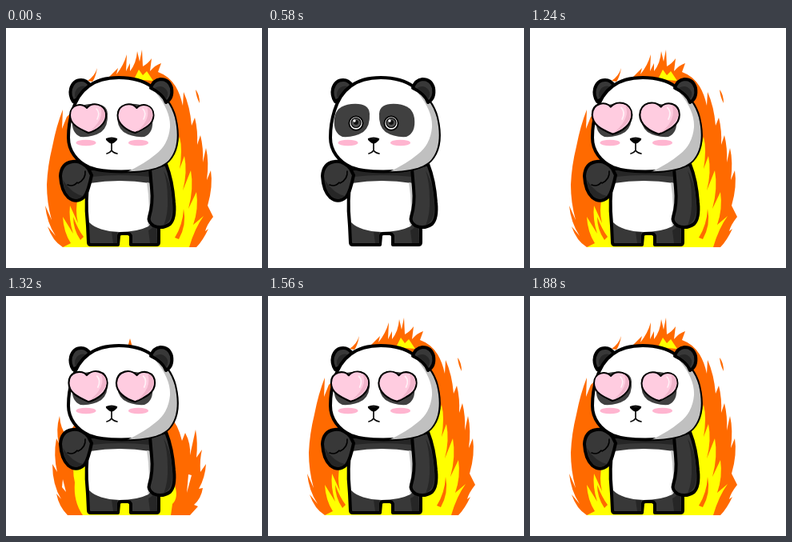
Write an HTML page that moves like this. It is 320 px wide and 300 px high and loops after 1.96 s.

```html
<!DOCTYPE html>
<html lang="en">
<head>
<meta charset="utf-8">
<title>Panda on fire</title>
<style>
  html, body { margin: 0; width: 100%; height: 100%; overflow: hidden; background: #fff; }
  svg { display: block; width: 320px; height: 300px; }
  .flame, #hearts { visibility: hidden; }
  .orange { fill: #ff6a00; }
  .yellow { fill: #ffff00; }
  .gap { fill: #fff; }
  .ink { stroke: #000; stroke-width: 4; stroke-linejoin: round; stroke-linecap: round; }
  .thin { stroke: #000; stroke-width: 1.6; stroke-linejoin: round; stroke-linecap: round; fill: none; }
  .fur { fill: #383838; }
  .shade { fill: #262626; }
  .patch { fill: #404040; }
  .blush { fill: #ffb5d0; }
  .heart { fill: #ffcce0; stroke: #000; stroke-width: 2; stroke-linejoin: round; }
  .glint { fill: none; stroke: #fff0f6; stroke-width: 1.6; stroke-linecap: round; }
  .dusk { fill: #f0b4ca; }
</style>
</head>
<body>
<svg viewBox="0 0 320 300">
  <defs>
    <clipPath id="headClip"><use href="#headShape"/></clipPath>
    <clipPath id="floor"><rect width="320" height="274"/></clipPath>
    <path id="headShape" d="M103 73C113 65 126 62 141 62C157 62 171 65 183 74C196 83 207 96 211 112C216 133 214 151 206 162C198 174 180 178 160 179C140 180 119 180 104 174C88 167 78 153 78 137C78 119 83 87 103 73Z"/>
    <path id="heart" d="M101 100C96 93 80 95 80 109C80 121 92 126 103 131C114 128 125 120 125 109C124 94 108 92 101 100Z"/>
    <g id="blaze">
      <path class="orange" d="M71 274Q58 266 52 248L62 260Q51 243 49 222L57 240Q51 218 51 196Q52 172 58 148Q63 122 71 102L70 126 76 111 90 98 126 64 140 50 138 58Q147 47 151 33L150 54 155 44 155 54Q163 44 164 29L167 42 170 27 171 48Q178 44 182 38L180 54Q187 46 194 44L190 55Q204 60 212 73Q218 83 221 97L222 80Q230 98 232 122L236 112Q240 128 239 146L243 134Q247 150 246 168L250 150Q254 167 251 190L256 178Q259 198 252 222L259 236Q251 246 249 254L253 251Q246 266 238 274Z"/>
      <path class="orange" d="M102 66Q111 60 114 50Q112 62 108 67ZM237 77Q242 83 242 94Q238 87 237 77Z"/>
      <path class="yellow" d="M160 64L166 52 171 59 176 54 184 66Z"/>
      <path class="yellow" d="M71 274L81 269Q72 255 71 236L84 257Q78 238 80 222L90 244Q86 228 90 212L104 205 190 172 212 152 217 136Q221 152 217 176L223 160Q227 180 221 203L231 178Q235 200 228 226L238 205Q241 226 234 246L247 235Q236 250 229 274Z"/>
      <path class="orange" d="M211 262Q221 246 222 226Q226 246 216 264ZM93 265Q84 252 84 236Q90 252 97 261Z"/>
    </g>
  </defs>

  <rect width="320" height="300" fill="#fff"/>

  <g clip-path="url(#floor)">
    <g class="flame">
      <path class="orange" d="M96 274Q85 255 83 231Q82 211 94 194L190 163 203 166Q215 181 212 204L215 210Q214 222 214 235L215 247Q210 263 201 274Z"/>
      <path class="gap" d="M214 180Q210 194 211 211L214 210ZM86 246L91 263 87 261Z"/>
      <path class="yellow" d="M141 274L144 262 148 266 151 257 155 274Z"/>
    </g>
    <use class="flame" href="#blaze" transform="translate(27.4 54.8) scale(.82 .8)"/>
    <use class="flame" href="#blaze"/>
    <g class="flame">
      <path class="orange" d="M77 274Q66 263 63 247L69 254Q58 236 58 210L64 220Q59 199 63 178L66 184Q62 167 67 150Q68 166 76 175L152 64 155 53 158 64 205 151Q215 160 220 181L224 171Q231 184 230 199L237 167Q240 184 238 202L245 192Q242 204 243 220L250 210Q249 227 241 241L246 240Q244 253 235 261L240 263 230 274Z"/>
      <path class="gap" d="M71 181L76 205 72 198ZM71 229L75 245 70 239ZM232 224L226 246 228 223Z"/>
      <path class="yellow" d="M96 274Q84 257 86 233Q82 217 87 204L104 200 190 215 211 237Q216 252 208 260L206 274Z"/>
    </g>
  </g>

  <g>
    <!-- body and legs -->
    <path class="fur ink" d="M105 176L182 176 188 215 191 247 191 268Q191 271 188 271H156V260Q155 257 152 257H145Q141 257 141 260L140 271H106Q103 271 103 268L102 247Q98 211 105 176Z"/>
    <path class="shade" d="M106 178H180V186Q142 182 107 186Z"/>
    <path class="shade" d="M178 253Q184 250 188 244L189 269H180ZM132 255H139V269H134Z"/>
    <path fill="#fff" d="M105 194Q142 188 180 194L182 220Q188 237 178 248Q164 255 142 255Q115 254 104 243Q101 214 105 194Z"/>
    <path fill="#c9c9c9" d="M176 193L181 194 183 222Q188 238 177 248Q181 225 176 193Z"/>

    <!-- arms -->
    <path class="fur ink" d="M180 176L200 170Q208 190 210 218Q212 238 205 245Q195 252 184 247Q177 242 179 236Q184 220 182 200Z"/>
    <path class="shade" d="M197 178Q208 197 208 226Q208 241 197 247Q203 232 202 213Q202 193 197 178Z"/>
    <g id="arm">
      <path class="fur ink" d="M103 176Q94 165 83 167Q69 169 68 185Q69 204 78 212Q88 220 98 211Q103 204 107 184Z"/>
      <path class="shade" d="M71 190Q73 206 81 212Q89 216 96 210Q82 207 71 190Z"/>
      <path class="thin" d="M77 196Q84 199 89 193M99 179Q100 189 90 194"/>
    </g>

    <!-- head -->
    <path class="fur ink" d="M84 92Q79 84 81 76Q84 65 94 65Q101 65 105 72L94 86Z"/>
    <path class="shade" d="M87 89Q84 78 91 74Q96 71 102 74Z"/>
    <use href="#headShape" class="ink" fill="#fff"/>
    <g clip-path="url(#headClip)">
      <path fill="#c0c0c0" d="M188 82Q206 104 205 124Q203 146 187 158Q173 170 149 181L222 185 220 82Z"/>
    </g>
    <path class="fur ink" d="M181 75Q184 65 193 64Q204 64 207 75Q209 88 200 93Q196 82 181 75Z"/>
    <path class="shade" d="M186 75Q195 70 201 78Q204 83 200 89Q195 80 186 75Z"/>

    <path class="patch" d="M83 113Q85 97 104 95Q126 93 127 107Q128 123 119 130Q108 137 93 136Q81 131 83 113Z"/>
    <path class="patch" d="M183 113Q181 97 162 95Q140 93 139 107Q138 123 147 130Q158 137 173 136Q185 131 183 113Z"/>
    <g id="eyes"></g>

    <ellipse class="blush" cx="100" cy="143.500" rx="12.500" ry="3.800"/>
    <ellipse class="blush" cx="165.500" cy="143.500" rx="12.500" ry="3.800"/>
    <path d="M125 138Q132 135 139 138Q140 140 135 143.500Q132 145.500 129 143.500Q124 140 125 138Z"/>
    <path d="M128 138.500Q132 137 136 138.500Z" fill="#444"/>
    <path class="thin" d="M132 144V153M126 157Q130 156 132 153Q134 156 139 157"/>

    <g id="hearts">
      <g class="beat">
        <use href="#heart" class="heart"/>
        <path class="dusk" d="M117 97.500Q125 102 124 110Q121 121 104 130Q117 119 119 109Q120 102 117 97.500Z"/>
        <path class="glint" d="M113 101Q118 106 114 114"/>
      </g>
      <g class="beat">
        <use href="#heart" class="heart" transform="translate(264.500 0) scale(-1 1)"/>
        <path class="dusk" d="M176 97.500Q184 102 183.500 110Q179 122 163 130Q175 120 177 110Q178 103 176 97.500Z"/>
        <path class="glint" d="M171 101Q176 106 172 114"/>
      </g>
    </g>
  </g>
</svg>

<script>
const LOOP = 1960, STEP = 80, CALM = 80, RAISE = 580, FIRE = 1080;
const beats = [1, 1.05, 1.1, 1.07, 1.03, 1, 1.05, 1.1, 1.13, 1.06, 1];
const centers = [[102, 114], [162, 114]];

const el = id => document.getElementById(id);
const flames = [...document.querySelectorAll('.flame')];
const hearts = [...document.querySelectorAll('.beat')];
const show = (node, on) => { node.style.visibility = on ? 'visible' : 'hidden'; };

el('eyes').innerHTML = [110, 154].map(x => `
  <circle cx="${x}" cy="119" r="8.6" fill="#fff" stroke="#000" stroke-width="1.8"/>
  <circle cx="${x}" cy="118.5" r="6" fill="#555" stroke="#000" stroke-width="1.2"/>
  <circle cx="${x}" cy="118" r="3" fill="#111"/>
  <circle cx="${x - 2}" cy="116" r="1.7" fill="#fff"/>`).join('');

function draw(t) {
  const burning = t < CALM || t >= FIRE;
  const step = t < CALM ? beats.length - 1 : Math.floor((t - FIRE) / STEP);
  const phase = burning ? step % flames.length : -1;

  flames.forEach((f, i) => show(f, i === phase));
  show(el('hearts'), burning);
  show(el('eyes'), !burning);
  el('arm').setAttribute('transform', `rotate(${t >= CALM && t < RAISE ? -4 : 0} 102 192)`);

  if (burning) hearts.forEach((h, i) => {
    const [x, y] = centers[i];
    h.setAttribute('transform', `translate(${x} ${y}) scale(${beats[step]}) translate(${-x} ${-y})`);
  });
}

function tick() {
  draw(performance.now() % LOOP);
  requestAnimationFrame(tick);
}
tick();
</script>
</body>
</html>
```
